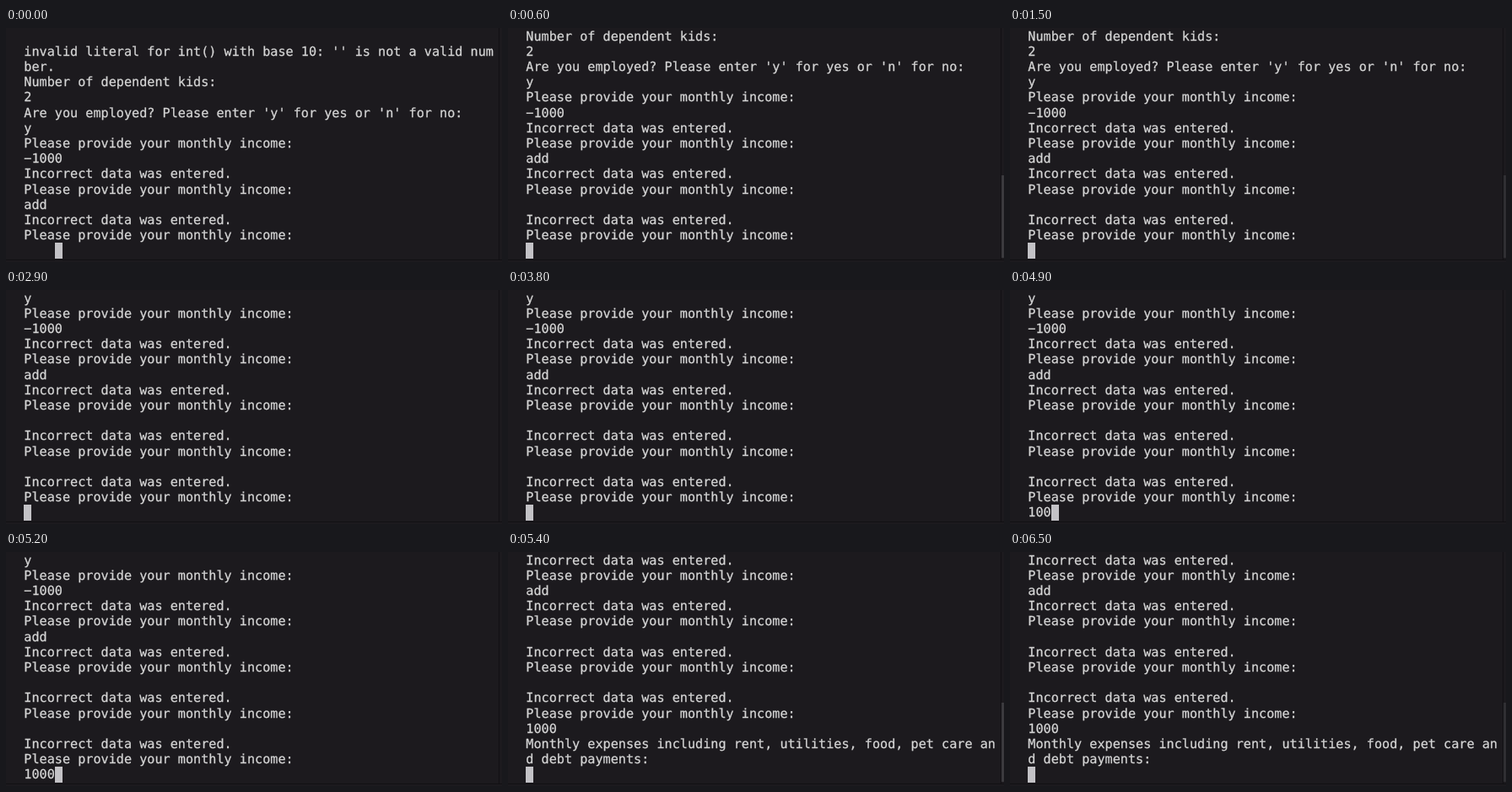
These frames come from a looping animation (588 by 278 pixels, 8000 ms). An HTML page:

```html
<!DOCTYPE html>
<html lang="en">
<head>
<meta charset="utf-8">
<title>Terminal session</title>
<style>
  html, body { margin: 0; width: 100%; height: 100%; overflow: hidden; background: #1c1a1e; }
  #stage { position: relative; width: 588px; height: 278px; overflow: hidden; background: #1c1a1e; }
  #stage div { position: absolute; }
  .row {
    left: 21.3px; height: 18.2px; line-height: 18.2px; white-space: pre; color: #d6d6d6;
    font-family: "DejaVu Sans Mono", Menlo, monospace; font-size: 15.16px;
    font-kerning: none; font-variant-ligatures: none;
    text-rendering: geometricPrecision; -webkit-text-stroke: 0.25px #d6d6d6;
  }
  #cursor { top: 255px; width: 9px; height: 18.5px; background: #c3c2c6; }
  #edge { left: 584px; top: 0; width: 1px; height: 275px; background: #111013; }
  #base { left: 0; top: 275px; width: 588px; height: 1px; background: #111013; }
  #thumb { left: 585px; width: 3px; }
</style>
</head>
<body>
<div id="stage">
  <div id="rows"></div>
  <div id="cursor"></div>
  <div id="edge"></div>
  <div id="thumb"></div>
  <div id="base"></div>
</div>
<script>
const LOOP = 8000, PITCH = 18.2, TOP = 0.55, CELL = 9.13, LEFT = 21.4, LAST = 14;
const ask = "Please provide your monthly income:";
const bad = "Incorrect data was entered.";
const log = [
  "",
  "invalid literal for int() with base 10: '' is not a valid num",
  "ber.",
  "Number of dependent kids:",
  "2",
  "Are you employed? Please enter 'y' for yes or 'n' for no:",
  "y",
  ask, "\u22121000", bad,
  ask, "add", bad,
  ask, "", bad,
  ask, "", bad,
  ask, "1000",
  "Monthly expenses including rent, utilities, food, pet care an",
  "d debt payments:"
];

// time, lines scrolled away, text on the input line
const steps = [
  [0, 0, "    "],
  [600, 3, ""],
  [2900, 6, ""],
  [4100, 6, "1"],
  [4500, 6, "10"],
  [4900, 6, "100"],
  [5100, 6, "1000"],
  [5400, 9, ""]
];

// time, scrollbar colour
const glow = [
  [0, "transparent"],
  [600, "#3b3a3e"],
  [1500, "#302f33"],
  [2900, "transparent"],
  [5400, "#3b3a3e"],
  [6500, "#302f33"]
];

const el = id => document.getElementById(id);
const indexAt = (table, t) => table.findLastIndex(entry => t >= entry[0]);

const rows = [];
for (let i = -1; i <= LAST; i++) {
  const row = document.createElement("div");
  row.className = "row";
  row.style.top = TOP + i * PITCH + "px";
  el("rows").append(row);
  rows.push(row);
}

let shown = -1;
function showStep(index) {
  if (index === shown) return;
  shown = index;
  const [, scroll, input] = steps[index];
  rows.forEach((row, k) => {
    const i = k - 1;
    row.textContent = i === LAST ? input : log[scroll + i] || "";
  });
  el("cursor").style.left = LEFT + input.length * CELL + "px";
  const top = 173 + scroll * 2 / 3;
  el("thumb").style.top = top + "px";
  el("thumb").style.height = 273 - top + "px";
}

function draw(now) {
  const t = now % LOOP;
  showStep(indexAt(steps, t));
  el("thumb").style.background = glow[indexAt(glow, t)][1];
  requestAnimationFrame(draw);
}
draw(performance.now());
</script>
</body>
</html>
```
